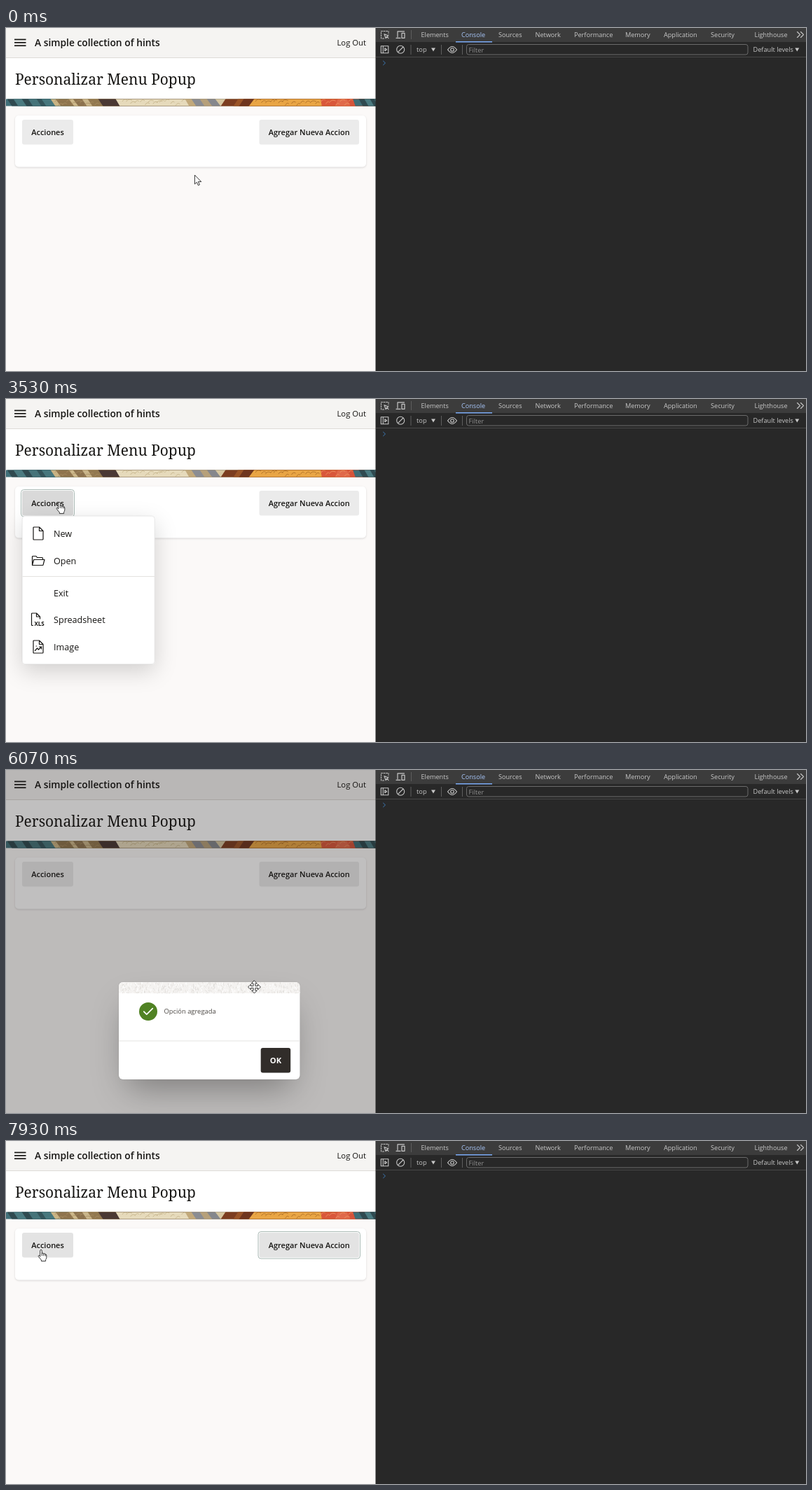
Recreate the animation shown at these times as an HTML page with a canvas. Size 1142 by 490 pixels, loop 8 s.

```html
<!DOCTYPE html>
<html lang="es">
<head>
<meta charset="utf-8">
<title>Menu Popup</title>
<style>
html, body { margin: 0; width: 100%; height: 100%; overflow: hidden; background: #282828; }
canvas { display: block; }
</style>
</head>
<body>
<canvas id="stage" width="1142" height="490"></canvas>
<script>
const ctx = document.getElementById('stage').getContext('2d');
const SANS = '"Open Sans", "Noto Sans", sans-serif';
const INK = '#161513';
const LOOP = 8000;

const BTN_MENU = { x: 23, y: 131, w: 73, h: 35.5 };
const BTN_ADD = { x: 361.5, y: 131, w: 142.5, h: 35.5 };
const DIALOG = { x: 134, y: 438, w: 258.5, h: 139 };
const BTN_OK = { x: 202.7, y: 94, w: 42.5, h: 35.5 };
const GRIP = { x: 327, y: 445 };
const STRIP = { top: 101.5, bottom: 111.5 };

const ITEMS = [
  { label: 'New', y: 173, icon: 'page' },
  { label: 'Open', y: 212, icon: 'folder' },
  { label: 'Exit', y: 258 },
  { label: 'Spreadsheet', y: 296, icon: 'sheet' },
  { label: 'Image', y: 335, icon: 'image' }
];

// Pointer moves: start, end, control point, target
const START = [269, 210];
const MOVES = [
  [0, 670, 140, 35, 43, 147],
  [1670, 2530, 193, 250, 120, 353],
  [2530, 2670, 117, 360, 113, 365],
  [2670, 3400, 245, 240, 76, 147],
  [3600, 4400, 230, 152, 397, 144],
  [4530, 5130, 395, 270, 368, 394],
  [5130, 5330, 356, 435, 337, 468],
  [5330, 5730, 330, 462, 327, 445],
  [5800, 6070, 340, 375, 354, 310],
  [6070, 6200, 355, 306, 355, 303],
  [6200, 6730, 368, 350, 376, 404],
  [7130, 7930, 150, 45, 50, 155]
];

function random(seed) {
  return () => (seed = (seed * 16807) % 2147483647) / 2147483647;
}

function inside(p, b) {
  return p.x >= b.x && p.x < b.x + b.w && p.y >= b.y && p.y < b.y + b.h;
}

// Pointers sit on whole pixels
function pointerAt(t) {
  let [x, y] = START;
  for (const [a, b, cx, cy, tx, ty] of MOVES) {
    if (t <= a) break;
    const k = Math.min(1, (t - a) / (b - a));
    const s = k * k * (3 - 2 * k), r = 1 - s;
    x = r * r * x + 2 * r * s * cx + s * s * tx;
    y = r * r * y + 2 * r * s * cy + s * s * ty;
  }
  return { x: Math.round(x), y: Math.round(y) };
}

function rect(x, y, w, h, color) {
  ctx.fillStyle = color;
  ctx.fillRect(x, y, w, h);
}

function round(b, r, fill, stroke) {
  ctx.beginPath();
  ctx.roundRect(b.x, b.y, b.w, b.h, r);
  if (fill) { ctx.fillStyle = fill; ctx.fill(); }
  if (stroke) { ctx.strokeStyle = stroke; ctx.lineWidth = 1; ctx.stroke(); }
}

function shadow(color, blur, dy, draw) {
  ctx.save();
  ctx.shadowColor = color;
  ctx.shadowBlur = blur;
  ctx.shadowOffsetY = dy;
  draw();
  ctx.restore();
}

function text(str, x, y, size, color, weight = 400, family = SANS, align = 'left') {
  ctx.font = `${weight} ${size}px ${family}`;
  ctx.textAlign = align;
  ctx.fillStyle = color;
  ctx.fillText(str, x, y);
}

function path(d, x, y, stroke, width = 1, fill) {
  const p = new Path2D(d);
  ctx.save();
  ctx.translate(x, y);
  if (fill) { ctx.fillStyle = fill; ctx.fill(p); }
  if (stroke) {
    ctx.strokeStyle = stroke;
    ctx.lineWidth = width;
    ctx.lineJoin = ctx.lineCap = 'round';
    ctx.stroke(p);
  }
  ctx.restore();
}

// Strip edges: top x, lean to the bottom, colour
const BANDS = [
  [0, 0, '#41707a'], [1, 8, '#2f4a50'], [10, 8, '#4a7a80'], [22, 8, '#2f4a50'],
  [31, 8, '#457379'], [43, 8, '#34545a'], [50, 8, '#47777d'], [63, 8, '#c9b384'],
  [70, 9, '#8f744d'], [89, 9, '#cdb88b'], [95, 9, '#8c724e'], [108, 8, '#c9b58a'],
  [116, 8, '#92784f'], [131, 8, '#4a3834'], [156, 7, '#e6dabb'], [255, 7, '#c2a97b'],
  [264, 8, '#8b8d92'], [276, 8, '#b6a07a'], [286, 9, '#85878c'], [298, 9, '#d6c6a0'],
  [314, -8, '#7c3d20'], [332, -8, '#9a5427'], [340, -8, '#6f361f'], [355, -9, '#e9a544'],
  [449, 2, '#d9573b'], [474, -4, '#e0694a'], [486, 6, '#d5543a'], [495, 4, '#3f6d76'],
  [503, 7, '#2f4a50'], [511, 7, '#4a7a80'], [519, 7, '#2f4a50'], [525, 7, '#47777d']
];

function scribble(x0, x1, color, seed) {
  const r = random(seed);
  ctx.strokeStyle = color;
  ctx.lineWidth = 0.8;
  ctx.beginPath();
  for (let x = x0; x < x1; x += 4 + r() * 5) {
    const y = 102 + r() * 6;
    ctx.moveTo(x, y + 3);
    ctx.quadraticCurveTo(x + 3, y - 2, x + 5 + r() * 4, y + 1);
  }
  ctx.stroke();
}

function banner() {
  const { top, bottom } = STRIP;
  ctx.save();
  ctx.beginPath();
  ctx.rect(0, top, 528, bottom - top);
  ctx.clip();
  for (const [x, lean, color] of BANDS) {
    ctx.fillStyle = color;
    ctx.beginPath();
    ctx.moveTo(x, top - 1);
    ctx.lineTo(540, top - 1);
    ctx.lineTo(540, bottom + 1);
    ctx.lineTo(x + lean, bottom + 1);
    ctx.fill();
  }
  scribble(166, 252, '#c3b187', 11);
  scribble(356, 444, '#a86a26', 29);
  scribble(450, 494, '#ee9a62', 47);
  scribble(70, 130, '#a98f62', 61);
  ctx.restore();
}

function ring(b) {
  round({ x: b.x - 1.5, y: b.y - 1.5, w: b.w + 3, h: b.h + 3 }, 4, '#fff', '#a9b9b4');
}

function button(b, label, color, focused) {
  if (focused) ring(b);
  round(b, 3, color);
  text(label, b.x + b.w / 2, 153, 11, INK, 600, SANS, 'center');
}

function page(s) {
  rect(0, 0, 528, 490, '#fbf9f8');
  rect(0, 0, 528, 42, '#f5f4f2');
  rect(0, 42, 528, 1, '#dddad7');
  rect(0, 43, 528, 58.5, '#fff');
  for (const y of [15.6, 20, 24.4]) rect(12, y, 16.5, 1.7, INK);
  text('A simple collection of hints', 41, 26, 13.8, INK, 600);
  text('Log Out', 514, 25, 11.3, INK, 500, SANS, 'right');
  text('Personalizar Menu Popup', 13, 80.5, 20.9, INK, 400, '"Noto Serif", serif');
  banner();
  const card = { x: 13, y: 125, w: 501, h: 73.5 };
  shadow('rgba(0,0,0,.14)', 3, 1, () => round(card, 5, '#fff'));
  button(BTN_MENU, 'Acciones', s.menuColor, s.menuFocus);
  button(BTN_ADD, 'Agregar Nueva Accion', s.addColor, s.addFocus);
}

const SHEET = 'M0 1 Q0 0 1 0 H8.5 L14 5.5 V17 Q14 18 13 18 H1 Q0 18 0 17 Z M8.5 0 V5.5 H14';

function icon(kind, y) {
  const top = y + 10;
  if (kind === 'page') path(SHEET, 39, top, INK, 1.2);
  if (kind === 'folder') {
    path('M1 12 V1 Q1 0 2 0 H6.5 L8 2 H15 Q16 2 16 3 V5 M1 13 L3.2 5 H18.5 L16.5 12.5 Q16.3 13 15.8 13 Z', 36.5, y + 12.5, INK, 1.2);
  }
  if (kind === 'sheet') {
    path('M2 17.5 H1 Q0 17.5 0 16.5 V1 Q0 0 1 0 H7 L12 5 V8 M7 0 V5 H12', 36.5, top, INK, 1.2);
    text('XLS', 40.5, top + 18, 8, INK, 700);
  }
  if (kind === 'image') {
    path(SHEET, 39, top, INK, 1.2);
    path('M2.5 14.5 L5.5 11 L7.5 13 L11.5 9 M11.5 12 V9 H8.5 M4 8 h.6', 39, top, INK, 1.2);
  }
}

function menu(p, alpha) {
  const box = { x: 23, y: 167, w: 189.5, h: 212 };
  ctx.save();
  ctx.globalAlpha = alpha;
  shadow('rgba(0,0,0,.17)', 32, 10, () => round(box, 4, '#fff'));
  round({ x: 23.2, y: 167.2, w: 189, h: 211.5 }, 4, '#fff', 'rgba(0,0,0,.09)');
  for (const { label, y, icon: kind } of ITEMS) {
    if (inside(p, { x: 23, y, w: 189, h: 38.5 })) rect(23.5, y, 188.5, 38.5, '#f4f4f4');
    icon(kind, y);
    text(label, 68, y + 24, 12.6, INK);
  }
  rect(23.5, 253, 188.5, 1, '#e4e2df');
  ctx.restore();
}

function dialog(x, y, alpha, hover, focused) {
  const { w, h } = DIALOG;
  ctx.save();
  ctx.globalAlpha = alpha;
  ctx.translate(x, y);
  const box = { x: 0, y: 0, w, h };
  const core = { x: 12, y: 18, w: w - 24, h: h - 24 };
  shadow('rgba(0,0,0,.34)', 48, 18, () => round(core, 6, '#fff'));
  shadow('rgba(0,0,0,.1)', 2, 0, () => round(box, 6, '#fff'));

  ctx.save();
  round(box, 6);
  ctx.clip();
  rect(0, 0, w, 16, '#f4f2f0');
  const r = random(77);
  ctx.lineWidth = 0.8;
  for (let i = 0; i < 620; i++) {
    const px = r() * w, py = r() * 16;
    ctx.strokeStyle = r() < 0.5 ? '#fff' : '#dfdcd8';
    ctx.beginPath();
    ctx.moveTo(px, py);
    ctx.lineTo(px + r() * 3 - 1.5, Math.min(16, py + 1 + r() * 3));
    ctx.stroke();
  }
  ctx.restore();

  ctx.fillStyle = '#508223';
  ctx.beginPath();
  ctx.arc(42, 42, 13, 0, 7);
  ctx.fill();
  path('M0 4.5 L4 8.5 L12.5 0', 35.8, 37.7, '#fff', 1.7);
  text('Opción agregada', 64.4, 45.4, 9.4, '#4a4642');
  rect(0, 83.5, w, 1, '#e6e4e1');

  if (focused) ring(BTN_OK);
  round(BTN_OK, 3, hover ? '#45403c' : '#312d2a');
  text('OK', BTN_OK.x + BTN_OK.w / 2, 116, 11.2, '#fff', 700, SANS, 'center');
  ctx.restore();
}

function tools() {
  const gray = '#c7c7c7', line = '#5e5e5e';
  rect(527.5, 0, 615, 490, '#282828');
  rect(528, 0, 614, 20, '#3c3c3c');
  rect(528, 41, 614, 1, '#474747');

  const tabs = [['Elements', 592.5], ['Console', 650], ['Sources', 703], ['Network', 755.5],
    ['Performance', 811], ['Memory', 884], ['Application', 939], ['Security', 1006], ['Lighthouse', 1068.5]];
  for (const [label, x] of tabs) {
    text(label, x, 13, 9.15, label === 'Console' ? '#a8c7fa' : gray);
  }
  rect(642, 19, 52, 1.5, '#7cacf8');
  path('M0 0 L4 4 L0 8 M5 0 L9 4 L5 8', 1129.5, 5.5, gray, 1.1);

  ctx.setLineDash([2, 1.6]);
  path('M4 10.5 H0 V0 H10.5 V4', 535.5, 4.5, gray, 1);
  ctx.setLineDash([]);
  path('M0 0 L6 2.3 L3.6 3.5 L6 6 M0 0 L2.2 6 L3.5 3.5', 540, 8.7, gray, 1.1);
  path('M2 8 V0 H11.5 M0 9.5 H6 M8 2.5 H12 V9.5 H8 Z', 557, 4.8, gray, 1.2);
  rect(578, 3, 1, 13, line);

  path('M0 0 H10.5 V10 H0 Z M3 0 V10 M5.5 3 L8.3 5 L5.5 7 Z', 535.3, 25.7, gray, 1.1);
  path('M11 5.5 A5.5 5.5 0 1 1 0 5.5 A5.5 5.5 0 1 1 11 5.5 M1.7 9.3 L9.3 1.7', 557.7, 25.3, gray, 1.1);
  rect(577.5, 24, 1, 14, line);
  text('top', 586, 34.3, 9.3, gray);
  path('M0 0 H6 L3 5 Z', 607, 28.5, null, 1, gray);
  rect(621, 24, 1, 14, line);
  path('M0 4.5 Q6.5 -4.5 13 4.5 Q6.5 13.5 0 4.5 M8.8 4.5 A2.3 2.3 0 1 1 4.2 4.5 A2.3 2.3 0 1 1 8.8 4.5', 630.5, 26.5, gray, 1.1);
  rect(651, 24, 1, 14, line);
  round({ x: 657.5, y: 23.5, w: 401.5, h: 14.5 }, 3, null, '#6b6b6b');
  text('Filter', 660.5, 34.5, 9.3, '#8f8f8f');
  text('Default levels', 1066.5, 34.3, 9.2, gray);
  path('M0 0 H6 L3 5 Z', 1126.3, 28.5, null, 1, gray);
  path('M0 0 L3 2.8 L0 5.6', 538.5, 47.2, '#3b78b5', 1);
}

const CURSORS = {
  arrow: ['M0 0 V12.6 L2.9 9.9 L5 14.4 L7 13.5 L5 9.2 H9 Z', 0.4, 0.4],
  hand: ['M-1.3 9.8 V1.7 Q-1.2 .4 0 .4 Q1.2 .4 1.3 1.7 V6 Q1.6 5 2.6 5.1 Q3.7 5.2 3.8 6.4 Q4.3 5.5 5.2 5.8 Q6.1 6 6.2 7.1 Q7.6 6.6 7.8 8.2 V11.5 Q7.6 13.5 6.6 14.6 V16.6 H.4 V15 L-3.6 10.2 Q-4.3 9 -3.2 8.4 Q-2.4 8.1 -1.3 9.8 Z M1.3 6 V8.6 M3.8 6.4 V8.8 M6.2 7.1 V9', 0, 0],
  move: ['M0 -9 L3.8 -5 H1.4 V-1.4 H5 V-3.8 L9 0 L5 3.8 V1.4 H1.4 V5 H3.8 L0 9 L-3.8 5 H-1.4 V1.4 H-5 V3.8 L-9 0 L-5 -3.8 V-1.4 H-1.4 V-5 H-3.8 Z', 0.5, 0]
};

function cursor(kind, p) {
  const [d, ox, oy] = CURSORS[kind];
  path(d, p.x + ox, p.y + oy, '#222', 0.9, '#fff');
}

function draw(t) {
  const p = pointerAt(t);
  const between = (a, b) => t >= a && t < b;
  const menuOpen = between(1070, 3670);
  const modal = between(4600, 7130);
  const dialogOpen = between(4670, 7130);
  const overMenu = !modal && inside(p, BTN_MENU);
  const overAdd = !modal && inside(p, BTN_ADD);
  const idle = '#ebebeb', hover = '#e3e3e3';

  page({
    menuColor: menuOpen || between(930, 1070) ? '#d9d9d9' : overMenu ? hover : idle,
    menuFocus: between(930, 1070) || between(3470, 4470),
    addColor: between(4470, 4600) ? '#dcdbdb' : overAdd || t >= 7130 ? hover : idle,
    addFocus: between(4470, 4600) || t >= 7130
  });
  if (menuOpen) menu(p, t < 1130 ? 0.5 : 1);

  let kind = overMenu || overAdd ? 'hand' : 'arrow';
  if (menuOpen && ITEMS.some(({ y }) => inside(p, { x: 23, y, w: 189, h: 38.5 }))) kind = 'hand';

  if (modal) rect(0, 0, 528, 490, `rgba(22,21,19,${t < 4670 ? 0.14 : 0.27})`);
  if (dialogOpen) {
    const drag = t > 5800 ? pointerAt(Math.min(t, 6200)) : GRIP;
    const x = DIALOG.x + drag.x - GRIP.x;
    const y = DIALOG.y + drag.y - GRIP.y;
    const overOk = inside({ x: p.x - x, y: p.y - y }, BTN_OK);
    dialog(x, y, t < 4730 ? 0.5 : 1, overOk, t >= 6930);
    if (overOk) kind = 'hand';
    else if (inside(p, { x, y, w: DIALOG.w, h: 16 })) kind = 'move';
  }
  cursor(kind, p);
  tools();
}

function tick(now) {
  const step = Math.floor((now % LOOP) * 0.015 + 0.06) % 120;
  draw(Math.round(step * 20 / 3) * 10);
  requestAnimationFrame(tick);
}

draw(0);
requestAnimationFrame(tick);
</script>
</body>
</html>
```
